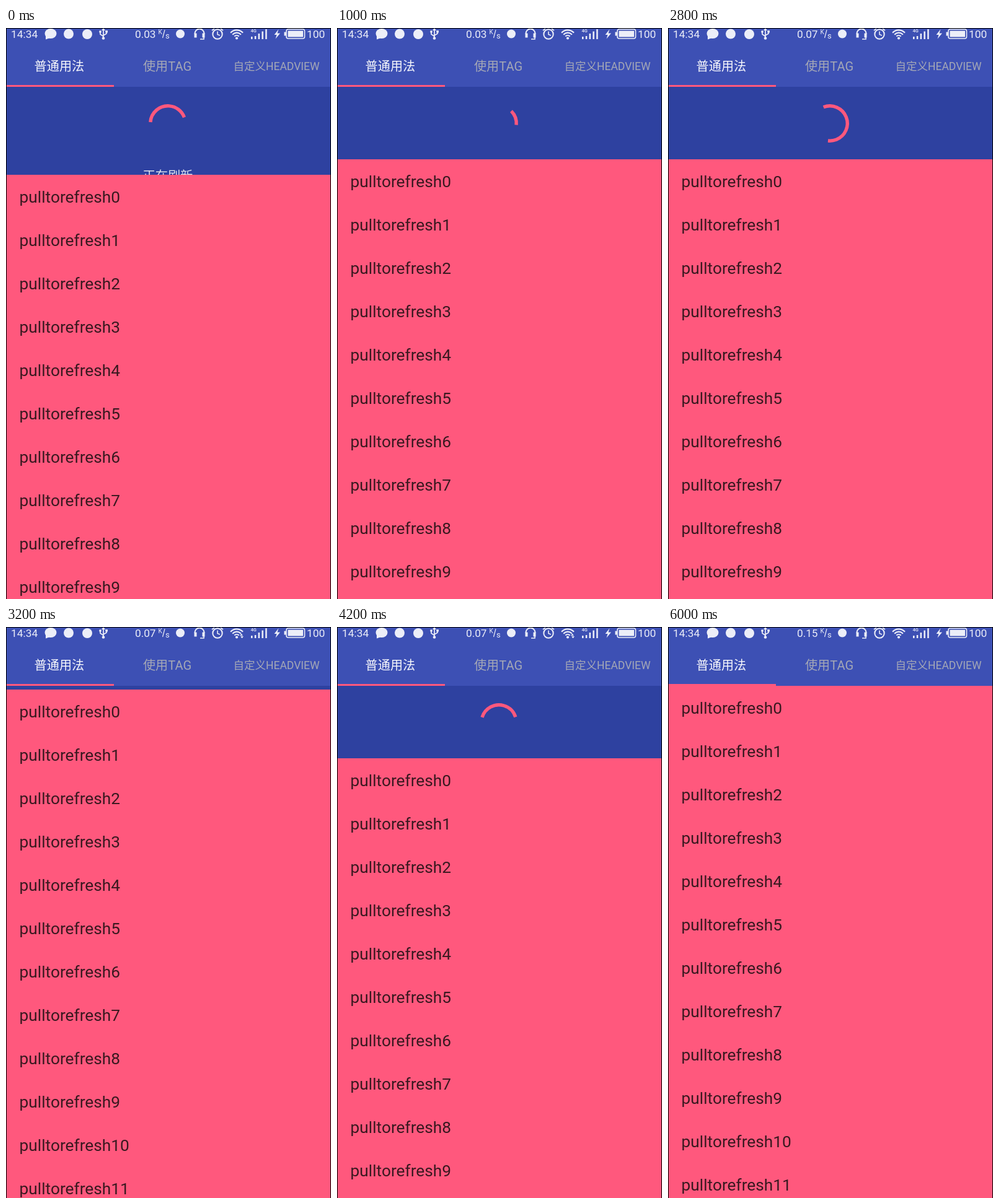
An HTML page with a canvas that plays this animation: 524x922 px, repeating every 6100 ms.

```html
<!DOCTYPE html>
<html lang="zh-CN">
<head>
<meta charset="utf-8">
<title>Pull to refresh</title>
<style>
html, body { margin: 0; width: 100%; height: 100%; overflow: hidden; background: #000; }
canvas { display: block; width: 524px; height: 922px; }
</style>
</head>
<body>
<canvas id="stage" width="524" height="922"></canvas>
<script>
const ctx = document.getElementById('stage').getContext('2d');
const LOOP = 6100, STEP = 100;
const FAMILY = 'Roboto, "Noto Sans CJK SC", "Noto Sans CJK", sans-serif';
const PINK = '#ff587d', TAB = '#3d50b4', HEADER = '#2e41a0', ICON = '#eceef8';
const CLOSED = 95, RESTING = 212;
const PULL_START = 3190, RELEASE = 3650;
const TAU = Math.PI * 2;

const rad = deg => deg * Math.PI / 180;
const ease = x => (1 - Math.cos(Math.PI * Math.min(1, Math.max(0, x)))) / 2;

// Piecewise linear value through [time, value] points.
function along(points, t) {
  if (t <= points[0][0]) return points[0][1];
  for (let i = 1; i < points.length; i++) {
    const [t0, v0] = points[i - 1], [t1, v1] = points[i];
    if (t <= t1) return v0 + (v1 - v0) * (t - t0) / (t1 - t0);
  }
  return points[points.length - 1][1];
}

function listTop(t) {
  if (t < 2850) return along([[700, 237], [800, 223], [900, 214], [1000, RESTING]], t);
  const collapse = from => RESTING + (CLOSED - RESTING) * ease((t - from) / 300);
  if (t < PULL_START) return collapse(2850);
  if (t < 5650) {
    return along([[PULL_START, CLOSED], [3300, 165], [3400, 222], [3500, 264], [3600, 273],
      [3700, 261], [3800, 233], [3900, 215], [4000, RESTING]], t);
  }
  return collapse(5650);
}

// A wheel that grows, waits, shrinks and waits while it turns.
function spinnerArc(age) {
  const wait = 186, change = 427, cycle = 2 * (wait + change), travel = 254;
  const turns = Math.floor(age / cycle), phase = age - turns * cycle;
  const grown = ease((phase - wait) / change);
  const shrunk = ease((phase - 2 * wait - change) / change);
  const start = -133 + 0.203 * age + travel * (turns + shrunk);
  return [start, start + 16 + travel * (grown - shrunk)];
}

function spinnerAge(t) {
  if (t >= PULL_START) return t - PULL_START;
  return along([[700, 875], [1000, 1000], [3200, 3200]], t) + 124;
}

function text(str, x, y, size, color, weight = 400) {
  ctx.font = `${weight} ${size}px ${FAMILY}`;
  ctx.fillStyle = color;
  ctx.fillText(str, x, y);
}

function box(x, y, w, h, color) {
  ctx.fillStyle = color;
  ctx.fillRect(x, y, w, h);
}

function disc(x, y, r, color = ICON) {
  ctx.fillStyle = color;
  ctx.beginPath();
  ctx.arc(x, y, r, 0, TAU);
  ctx.fill();
}

function arc(x, y, r, from, to, width, color = ICON) {
  ctx.strokeStyle = color;
  ctx.lineWidth = width;
  ctx.beginPath();
  ctx.arc(x, y, r, rad(from), rad(to));
  ctx.stroke();
}

function path(d, width) {
  const p = new Path2D(d);
  if (width) {
    ctx.strokeStyle = ICON;
    ctx.lineWidth = width;
    ctx.stroke(p);
  } else {
    ctx.fillStyle = ICON;
    ctx.fill(p);
  }
}

function statusBar(t) {
  text('14:34', 8, 16, 17.4, ICON);

  // message bubble
  ctx.fillStyle = ICON;
  ctx.beginPath();
  ctx.ellipse(72, 9, 9.5, 8, 0, 0, TAU);
  ctx.fill();
  path('M64 11 L64 18.5 L71 16 Z');

  disc(101, 9.5, 8);
  disc(131, 10, 8);

  // USB
  path('M157 1 V17 M152 6 V10 L157 13.5 M162 5 V9 L157 12', 1.7);
  path('M154 4 L157 0 L160 4 Z');
  disc(157, 16.5, 2.3);
  disc(152, 6, 1.9);
  box(160.3, 4, 3.6, 3.6, ICON);

  const rate = t < 2500 ? '0.03' : t < 4600 ? '0.07' : '0.15';
  text(rate, 208, 16, 17.2, ICON);
  text('K', 245.5, 10, 10, ICON);
  path('M256 3 L252.5 16', 1.2);
  text('s', 257, 16.5, 13, ICON);

  disc(281, 9.5, 7);

  // headset
  arc(312, 9, 7.5, 175, 365, 2);
  box(303.5, 8.5, 4, 7, ICON);
  box(316.5, 8.5, 4, 7, ICON);
  path('M319 14 V18 H313', 1.6);

  // alarm clock
  arc(341, 10, 7.7, 0, 360, 2);
  path('M341 5.5 V10.5 L345 12 M332 4 L336 1 M346 1 L350 4', 1.6);

  // wireless
  for (const r of [5, 9.3, 13.6]) arc(372, 17, r, 223, 317, 2.2);
  disc(372, 16.5, 2.1);
  if (t >= 3200 && t < 4600) path('M377 14 L379.5 10.8 L382 14 Z M378 15 H383 L380.5 18.2 Z');

  // signal
  text('4G', 394.5, 7, 7.5, ICON, 500);
  [4, 5, 9, 12.5, 16].forEach((h, i) => box(395 + i * 5.8, 18 - h, 2.5, h, ICON));

  // battery
  path('M439.5 2 L432.5 11 H436.5 L434.5 17.5 L442 8.5 H437.5 Z');
  ctx.strokeStyle = ICON;
  ctx.lineWidth = 1.6;
  ctx.beginPath();
  ctx.roundRect(452, 2, 29.5, 15, 3);
  ctx.stroke();
  box(454.5, 4.5, 24.5, 10, ICON);
  box(448.5, 6.5, 3, 6, ICON);
  text('100', 485, 16, 17.4, ICON);
}

function tabs(t) {
  box(1, 1, 522, CLOSED - 1, TAB);
  statusBar(t);
  text('普通用法', 45.5, 68.5, 20.2, '#f6f7fc', 500);
  text('使用TAG', 221, 68.5, 20.1, '#a5a8b6');
  text('自定义HEADVIEW', 366.5, 67.5, 17.5, '#a5a8b6');
  box(1, CLOSED - 3, 173, 3, PINK);
}

function refreshHeader(t) {
  box(1, CLOSED, 522, 185, HEADER);
  const pulling = t >= PULL_START && t < RELEASE;
  text(pulling ? '松开刷新' : '正在刷新', 220.5, 245.5, 20.2, '#e3e5ee');
  const [from, to] = spinnerArc(spinnerAge(t));
  arc(261, 154, 28.2, from, to, 5.4, PINK);
}

function list(top) {
  box(1, top, 522, 922 - top, PINK);
  for (let i = 0; top + i * 70 < 922; i++) {
    text('pulltorefresh' + i, 21.5, top + 45 + i * 70, 26.3, '#3a1920');
  }
}

function draw(t) {
  box(0, 0, 524, 922, '#000');
  ctx.save();
  ctx.beginPath();
  ctx.rect(1, 1, 522, 921);
  ctx.clip();
  refreshHeader(t);
  list(Math.round(listTop(t)));
  tabs(t);
  ctx.restore();
}

const began = performance.now();
function tick() {
  const t = (performance.now() - began) % LOOP;
  draw(t < 800 ? 0 : Math.floor(t / STEP) * STEP);
  requestAnimationFrame(tick);
}
tick();
</script>
</body>
</html>
```
